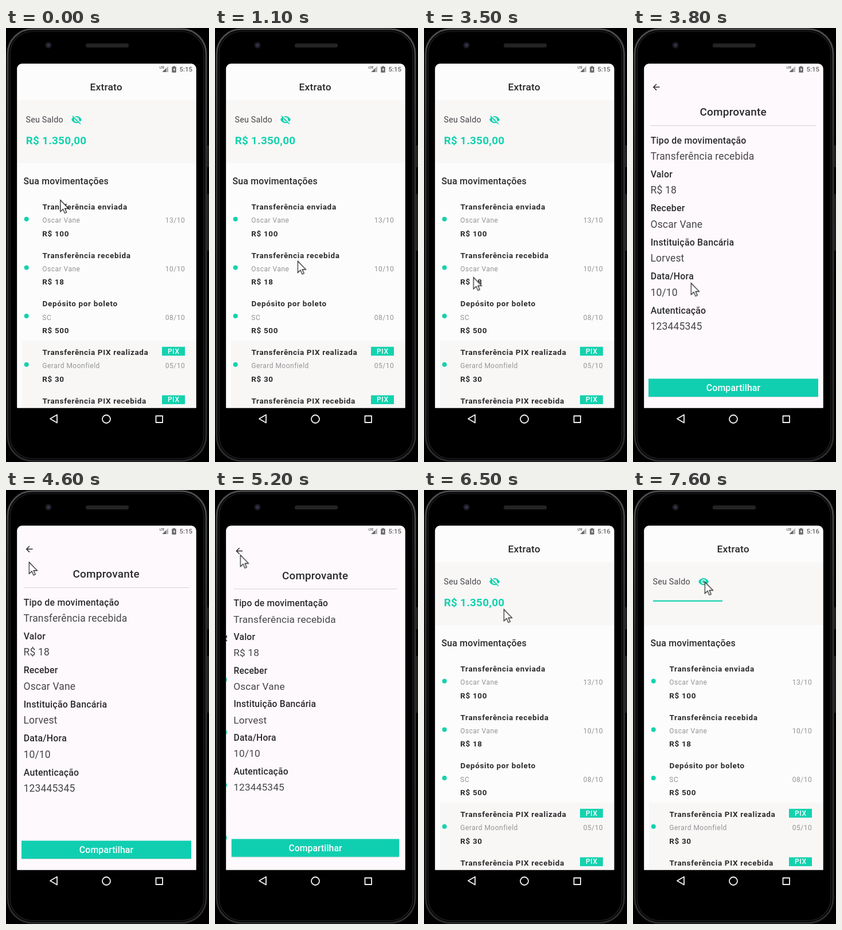
Animation of 354x758 px, one loop 8 s. Source, as an HTML page:

```html
<!DOCTYPE html>
<html lang="pt-BR">
<head>
<meta charset="utf-8">
<title>Extrato</title>
<style>
  html, body { margin: 0; width: 100%; height: 100%; overflow: hidden; background: #000; }
  svg { display: block; width: 100%; height: 100%; }
  text { font-family: Roboto, "Noto Sans", sans-serif; fill: #2a2a2c; }
  .mid { text-anchor: middle; }
  .end { text-anchor: end; }
  .teal { fill: #14d2ae; }
  .bar { font-size: 17.4px; font-weight: 500; letter-spacing: .2px; }
  .saldo { font-size: 14.3px; letter-spacing: .2px; fill: #46464a; }
  .total { font-size: 19.05px; font-weight: 700; letter-spacing: .2px; fill: #14d2ae; }
  .head { font-size: 15.9px; font-weight: 500; letter-spacing: .2px; }
  .row { font-size: 13.5px; font-weight: 700; letter-spacing: .65px; }
  .sub { font-size: 12px; letter-spacing: .5px; fill: #949496; }
  .pix { font-size: 12px; font-weight: 500; letter-spacing: .6px; fill: #fff; }
  .title { font-size: 19.05px; font-weight: 500; letter-spacing: .2px; }
  .value { font-size: 17.5px; letter-spacing: .15px; fill: #46464a; }
  .button { font-size: 15.9px; font-weight: 500; letter-spacing: .1px; fill: #fff; }
  .clock { font-size: 11.5px; font-weight: 500; fill: #666; }

  .list, .detail { transform-origin: 175.5px 363px; }
  .list { animation: list 8s step-end infinite; }
  .detail { animation: detail 8s step-end infinite; }
  .cursor { animation: cursor 8s step-end infinite; }
  .before { animation: before 8s step-end infinite; }
  .after { animation: after 8s step-end infinite; }
  .shown { animation: shown 8s step-end infinite; }
  .hidden { animation: hidden 8s step-end infinite; }

  @keyframes before { 0% { opacity: 1 } 72.5%, 100% { opacity: 0 } }
  @keyframes after { 0% { opacity: 0 } 72.5%, 100% { opacity: 1 } }
  @keyframes shown { 0% { opacity: 1 } 90%, 100% { opacity: 0 } }
  @keyframes hidden { 0% { opacity: 0 } 90%, 100% { opacity: 1 } }

  /* zoom page change: push, then pop */
  @keyframes list {
    0% { transform: scale(1) }
    46.25% { transform: scale(1.04) }
    47.5% { transform: scale(1.05) }
    65% { transform: scale(1.087) }
    66.25% { transform: scale(1.03) }
    67.5% { transform: scale(1.008) }
    68.75%, 100% { transform: scale(1) }
  }
  @keyframes detail {
    0% { opacity: 0; transform: scale(.85) }
    46.25% { opacity: .95; transform: scale(.96) }
    47.5% { opacity: 1; transform: scale(1) }
    65% { opacity: 1; transform: scale(.988) }
    66.25% { opacity: .4; transform: scale(.94) }
    67.5%, 100% { opacity: 0; transform: scale(.9) }
  }
  /* the pointer advances once every 100 ms */
  @keyframes cursor {
    0% { transform: translate(94.5px, 300px) }
    1.25% { transform: translate(58px, 205px) }
    2.5% { transform: translate(130px, 420px) }
    3.75% { transform: translate(245px, 648px) }
    5% { transform: translate(176px, 336px) }
    8.75% { transform: translate(176px, 336px); animation-timing-function: steps(4, jump-start) }
    13.75% { transform: translate(141px, 392px); animation-timing-function: steps(5, jump-start) }
    20% { transform: translate(156px, 465px) }
    22.5% { transform: translate(154px, 460px) }
    23.75% { transform: translate(152px, 457px) }
    26.25% { transform: translate(-40px, -40px) }
    36.25% { transform: translate(152px, 457px); animation-timing-function: steps(7, jump-start) }
    45% { transform: translate(86px, 435px) }
    46.25% { transform: translate(86px, 435px); animation-timing-function: steps(2, jump-start) }
    48.75% { transform: translate(101px, 445px); animation-timing-function: steps(7, jump-start) }
    57.5% { transform: translate(40px, 152px); animation-timing-function: steps(2, jump-start) }
    60% { transform: translate(40px, 99px); animation-timing-function: steps(2, jump-start) }
    62.5% { transform: translate(44px, 113px) }
    66.25% { transform: translate(44px, 113px); animation-timing-function: steps(3, jump-start) }
    70% { transform: translate(76px, 205px); animation-timing-function: steps(5, jump-start) }
    76.25% { transform: translate(68px, 335px); animation-timing-function: steps(2, jump-start) }
    78.75% { transform: translate(145px, 358px); animation-timing-function: steps(4, jump-start) }
    83.75% { transform: translate(137px, 158px) }
    85% { transform: translate(137px, 158px); animation-timing-function: steps(2, jump-start) }
    87.5%, 100% { transform: translate(125px, 160px) }
  }
</style>
</head>
<body>
<svg viewBox="0 0 354 758">
  <defs>
    <clipPath id="screen"><path d="M19.4 663.5V71a8.5 8.5 0 0 1 8.5-8.5H323a8.5 8.5 0 0 1 8.5 8.5V663.5z"/></clipPath>
    <path id="eye" fill-rule="evenodd" d="M12 4.5C7 4.5 2.73 7.61 1 12c1.73 4.39 6 7.5 11 7.5s9.27-3.11 11-7.5c-1.73-4.39-6-7.5-11-7.5zM12 17a5 5 0 1 1 0-10 5 5 0 0 1 0 10zm0-8a3 3 0 1 0 0 6 3 3 0 0 0 0-6z"/>
    <linearGradient id="rim" x2="0" y2="1">
      <stop offset="0" stop-color="#4c4c4e"/>
      <stop offset=".3" stop-color="#343436"/>
      <stop offset="1" stop-color="#2c2c2e"/>
    </linearGradient>
  </defs>

  <!-- phone -->
  <path d="M351 205h2.5v38H351zM351 290h2.5v99H351z" fill="#262628"/>
  <rect x="3" y="2" width="346" height="754" rx="43" fill="none" stroke="url(#rim)" stroke-width="3"/>
  <rect x="7" y="6" width="338" height="746" rx="39" fill="none" stroke="#2a2a2c" stroke-width="1.2"/>
  <circle cx="74" cy="30" r="5.5" fill="#1b1b22"/>
  <circle cx="74" cy="30" r="2.5" fill="#34344e"/>
  <rect x="139" y="27" width="75" height="7" rx="3" fill="#232325"/>
  <g fill="none" stroke="#f4f4f4" stroke-width="1.8" stroke-linejoin="round">
    <path d="M77 682.5l12-7v14z"/>
    <circle cx="175" cy="683" r="7"/>
    <path d="M261.5 677.5h11.5v11.5h-11.5z"/>
  </g>

  <g clip-path="url(#screen)">
    <rect x="19" y="62" width="313" height="602" fill="#fcfcfc"/>

    <g class="list">
      <rect x="19" y="62" width="313" height="602" fill="#fcfcfc"/>
      <rect x="19" y="126" width="313" height="110" fill="#f8f7f6"/>
      <rect x="28" y="546" width="304" height="118" fill="#f8f7f6"/>
      <text class="bar mid" x="174.7" y="109">Extrato</text>
      <text class="saldo" x="34.5" y="165">Seu Saldo</text>
      <g class="shown">
        <g transform="translate(113.3 150.3) scale(.81)">
          <use href="#eye" class="teal"/>
          <path d="M4.5 2.5L22 20" stroke="#f8f7f6" stroke-width="2.2"/>
          <path d="M3 4L20.5 21.5" stroke="#14d2ae" stroke-width="2"/>
        </g>
        <text class="total" x="34.7" y="203.3">R$ 1.350,00</text>
      </g>
      <g class="hidden">
        <use href="#eye" class="teal" transform="translate(113.3 150.3) scale(.81)"/>
        <rect class="teal" x="35" y="192.7" width="121" height="2.2"/>
      </g>
      <text class="head" x="30.5" y="273">Sua movimentações</text>
      <g id="rows"></g>
    </g>

    <g class="detail">
      <rect x="19" y="62" width="313" height="602" fill="#fef9fd"/>
      <path d="M46.5 103.3H36M41 98l-5.3 5.3 5.3 5.3" fill="none" stroke="#2a2a2c" stroke-width="1.5"/>
      <text class="title mid" x="174.7" y="153">Comprovante</text>
      <rect x="31" y="170" width="288" height="1" fill="#d3d0d3"/>
      <g id="fields"></g>
      <rect x="27" y="614" width="296" height="31" fill="#d5dcdb"/>
      <rect x="27" y="612.5" width="296" height="31.5" fill="#10cfb0"/>
      <text class="button mid" x="175" y="634">Compartilhar</text>
    </g>
  </g>

  <!-- status bar -->
  <g fill="#666">
    <text x="268" y="71" font-size="5" font-weight="500">LTE</text>
    <path d="M272.5 77L283 66.5V77z" fill="#b5b5b5"/>
    <path d="M272.5 77L279 70.5V77z"/>
    <path fill-rule="evenodd" d="M291.5 66.5h3v1.2h2.2v10h-7.4v-10h2.2zM293.8 69l-2.2 4h1.2v3l2.2-4h-1.2z"/>
  </g>
  <text class="clock before" x="302.5" y="76">5:15</text>
  <text class="clock after" x="302.5" y="76">5:16</text>

  <g class="cursor">
    <path transform="scale(1.22)" d="M.3.5V17l3.8-3.6 2.5 5.8 2.6-1.1-2.5-5.7h5.1z" fill="#fff" stroke="#111" stroke-width=".95"/>
  </g>
</svg>
<script>
  const rows = [
    ["Transferência enviada", "Oscar Vane", "13/10", "R$ 100"],
    ["Transferência recebida", "Oscar Vane", "10/10", "R$ 18"],
    ["Depósito por boleto", "SC", "08/10", "R$ 500"],
    ["Transferência PIX realizada", "Gerard Moonfield", "05/10", "R$ 30"],
    ["Transferência PIX recebida", "", "", ""]
  ];
  const fields = [
    ["Tipo de movimentação", "Transferência recebida"],
    ["Valor", "R$ 18"],
    ["Receber", "Oscar Vane"],
    ["Instituição Bancária", "Lorvest"],
    ["Data/Hora", "10/10"],
    ["Autenticação", "123445345"]
  ];
  const text = (cls, x, y, s) => `<text class="${cls}" x="${x}" y="${y}">${s}</text>`;
  const badge = '<rect class="teal" x="272" y="-14.3" width="40" height="15.5"/>' + text("pix mid", 292.3, -2.4, "PIX");

  document.getElementById("rows").innerHTML = rows.map(([name, who, date, sum], i) =>
    `<g transform="translate(0 ${317 + i * 84.7})">
      <circle class="teal" cx="35.7" cy="16.7" r="4"/>
      ${text("row", 63.5, 0, name)}
      ${text("sub", 63.3, 23.4, who)}
      ${text("sub end", 312.3, 23.4, date)}
      ${text("row", 63.3, 46.7, sum)}
      ${name.includes("PIX") ? badge : ""}
    </g>`).join("");

  document.getElementById("fields").innerHTML = fields.map(([label, value], i) =>
    text("head", 30.7, 201.5 + i * 59.4, label) + text("value", 30.5, 230 + i * 59.4, value)).join("");
</script>
</body>
</html>
```
